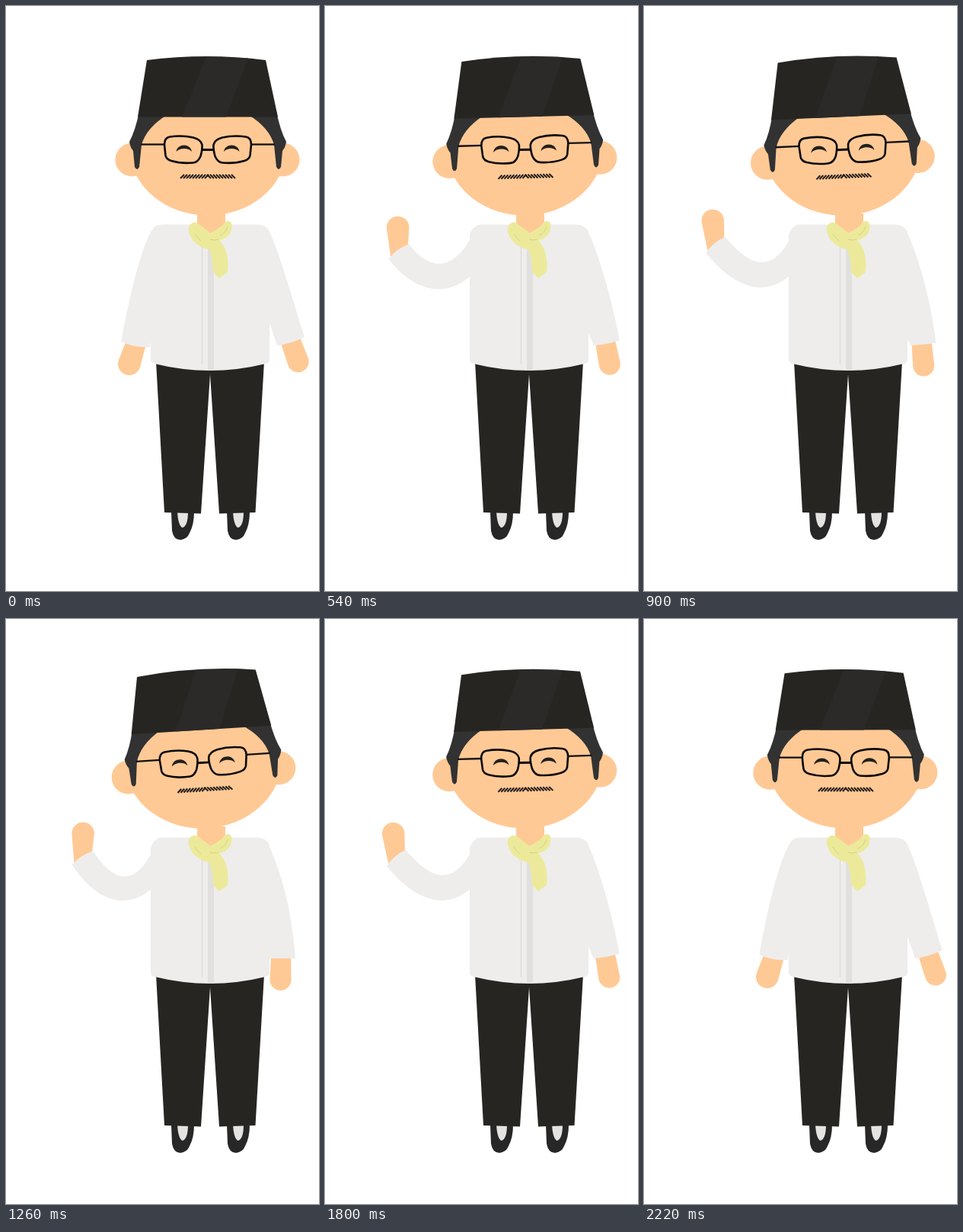
Recreate the animation shown at these times as an HTML page with a canvas. Size 411 px wide and 767 px high, loop 2250 ms.

```html
<!DOCTYPE html>
<html lang="en">
<head>
<meta charset="utf-8">
<title>Waving man</title>
<style>
  html, body { margin: 0; width: 100%; height: 100%; overflow: hidden; background: #fff; }
  canvas { display: block; width: 411px; height: 767px; }
</style>
</head>
<body>
<canvas id="stage" width="411" height="767"></canvas>
<script>
const ctx = document.getElementById('stage').getContext('2d');
const LOOP = 2250, STEP = 30;
const SWAY_PEAK = 1260, RISE = 720, WAVE = 360, FALL_START = 1800, FALL_END = 2220;
const SKIN = '#ffc995', SHIRT = '#eeedec', DARK = '#272522', HAIR = '#323232', SCARF = '#ecea9a';

const lerp = (a, b, k) => a + (b - a) * k;
const rad = deg => deg * Math.PI / 180;

// A point at a distance from another; the angle runs clockwise from straight up.
const polar = ([x, y], deg, length) =>
  [x + length * Math.sin(rad(deg)), y - length * Math.cos(rad(deg))];

function fill(d, color) {
  ctx.fillStyle = color;
  ctx.fill(new Path2D(d));
}

function line(d, color, width) {
  ctx.strokeStyle = color;
  ctx.lineWidth = width;
  ctx.stroke(new Path2D(d));
}

function disc(x, y, r, color) {
  ctx.fillStyle = color;
  ctx.beginPath();
  ctx.arc(x, y, r, 0, 2 * Math.PI);
  ctx.fill();
}

// Draws once as is and once mirrored around a vertical axis.
function mirrored(axis, draw) {
  draw();
  ctx.save();
  ctx.translate(2 * axis, 0);
  ctx.scale(-1, 1);
  draw();
  ctx.restore();
}

function hand([x, y], deg, length, base, r) {
  ctx.save();
  ctx.translate(x, y);
  ctx.rotate(rad(deg));
  ctx.fillStyle = SKIN;
  ctx.beginPath();
  ctx.moveTo(-base, 6);
  ctx.lineTo(-r, -length);
  ctx.arc(0, -length, r, Math.PI, 0);
  ctx.lineTo(base, 6);
  ctx.fill();
  ctx.restore();
}

// 0 is hanging, 1 is fully raised.
function armLift(t) {
  if (t < RISE) return 1 - (1 - t / RISE) ** 2;
  const k = (t - FALL_START) / (FALL_END - FALL_START);
  return (1 + Math.cos(Math.PI * Math.min(1, Math.max(0, k)))) / 2;
}

// Outward shift of the hand: a steady wave on top of one slow lean.
function armSwing(t) {
  return 14 * Math.exp(-(((t - 830) / 330) ** 2)) + 7 * Math.cos(2 * Math.PI * t / WAVE);
}

function wavingArm(t) {
  const lift = armLift(t);
  const swing = armSwing(t) * lift * lift;
  const bend = Math.sin(lift * Math.PI / 2);

  const wrist = polar([206, 300], 180 + lerp(14, 83, lift), lerp(148, 109, lift));
  wrist[0] -= 0.62 * swing;
  const cuff = lerp(-80, 54, bend) - 0.6 * swing;
  const width = lerp(19, 16.5, bend);
  const top = polar(wrist, cuff, width), bottom = polar(wrist, cuff, -width);

  const forearm = cuff - 90;
  const rim = polar(wrist, forearm, 5);
  const upper = polar(top, forearm, -lerp(90, 43, bend));
  const lower = polar(bottom, forearm, -lerp(25, 44, lift));

  hand(wrist, lerp(-162, -2, bend) - 0.67 * swing, lerp(27, 32, lift * lift), lerp(13, 11, bend), 14.8);
  fill(`M200 287C${200 - lerp(13, 30, lift)} ${287 + 76 * lift * lift} ${upper} ${top}` +
       `Q${rim} ${bottom}C${lower} ${192 - 42 * lift} 389 192 353L215 330V287Z`, SHIRT);
}

function restingArm(k) {
  const wrist = [374 - 13 * k, 440 + 5 * k];
  hand(wrist, lerp(160, 181, k), 28, 13, 14);
  fill(`M335 288L343 292C${352 + 3 * k} ${300 + 18 * k} ${375 - k} ${380 - 15 * k} ` +
       `${392 - 12 * k} ${434 + 11 * k}Q${wrist[0]} ${wrist[1] + 3 - 3 * k} ${356 - 8 * k} 445` +
       `L346 ${415 + 31 * k}L335 400Z`, SHIRT);
}

function shoe(x) {
  ctx.save();
  ctx.translate(x, 0);
  fill('M217 663L218 688Q220 700 229 700Q238 699 241 691Q247 680 247 663Z', '#272727');
  fill('M225 663H239Q239 682 231.5 684Q226 681 225 663Z', '#e4e3e1');
  ctx.restore();
}

function legs() {
  shoe(0);
  shoe(73);
  fill('M197 466H339L327.5 664L280 665.5L268 483L256 665.5L208 664Z', DARK);
}

function torso() {
  fill('M190 300Q194 287 206 286.5H330Q342 287 346 296V463Q346 468 341 469Q268 487 195 469Q190 468 190 463Z', SHIRT);
  fill('M265 305H273V478H265Z', '#e1e0df');
  line('M257.5 312V470', '#dcdbda', 1.3);
}

function scarf() {
  fill('M251 272H288V288L268 298L251 286Z', SKIN);
  fill('M252 285Q244 281 240 290Q238 297 246 308Q256 318 267 319Q272 333 272 349L280 357L291 349' +
       'Q293 333 288 319Q284 311 280 307Q294 304 296 293Q298 284 293 282Q287 281 284 288L269 298Z', SCARF);
  line('M248 299Q251 304 256 308M291 289Q289 297 281 301M268 306Q273 308 279 306', '#cfcd86', 0.9);
}

function face() {
  mirrored(264.5, () => disc(165.5, 201.5, 22, SKIN));
  fill('M161.5 190A104 91 0 0 0 369 190L322 140H208Z', SKIN);
  mirrored(265, () => {
    fill('M175 138Q170 163 162 178Q163 185 167 190Q168 201 169 211Q172 217 175 211L178 182Q184 160 211 143Z', HAIR);
    line('M177 181.5H208', '#111', 2.3);
    line('M208 182Q208 172.5 215 171.5Q231 169 246 172.5Q256 175 257.5 182Q258 188 255.5 197' +
         'Q252 205 246 205.5Q230 207 217 203Q210.5 201 209.5 196Z', '#090807', 2.6);
    fill('M223.5 191C225 179.5 242.5 179.5 244 191C240 185.5 228 185.5 223.5 191Z', '#22201d');
    for (let x = 229; x <= 261; x += 4) line(`M${x} 226L${x + 5} 221`, '#201c18', 2);
  });
  line('M257 188.5H273', '#090807', 3);
}

function hat() {
  fill('M173 145.5L185 71Q263 61 341 71L357 145.5Z', DARK);
  fill('M263 66.5L318 68.5L289 145.5H231Z', '#2b2a28');
}

function head(k) {
  ctx.save();
  ctx.translate(260, 283);
  ctx.rotate(rad(-3.55 * k));
  ctx.translate(-260, -283);
  face();
  hat();
  ctx.restore();
}

function draw(t) {
  const sway = t < SWAY_PEAK ? t / SWAY_PEAK : (LOOP - t) / (LOOP - SWAY_PEAK);
  ctx.fillStyle = '#fff';
  ctx.fillRect(0, 0, 411, 767);
  legs();
  wavingArm(t);
  restingArm(sway);
  torso();
  head(sway);
  scarf();
}

const start = performance.now();
function tick() {
  const t = (performance.now() - start) % LOOP;
  draw(Math.floor(t / STEP) * STEP);
  requestAnimationFrame(tick);
}
tick();
</script>
</body>
</html>
```
